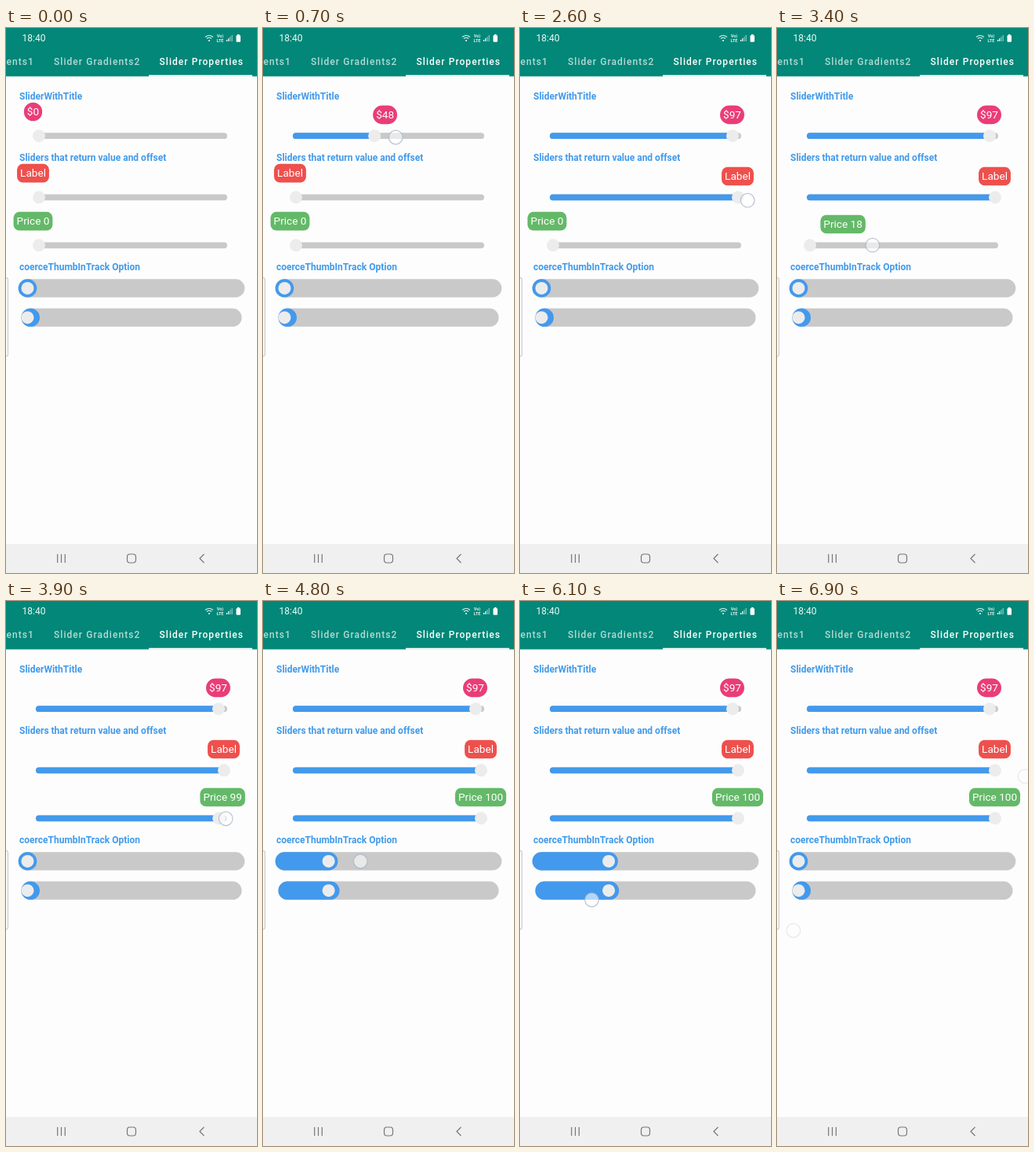
These frames come from a looping animation (320x693 px, 7000 ms). An HTML page with a canvas:

```html
<!DOCTYPE html>
<html lang="en">
<head>
<meta charset="utf-8">
<title>Slider Properties</title>
<style>
html, body { margin: 0; width: 100%; height: 100%; overflow: hidden; background: #fdfdfd; }
canvas { display: block; }
</style>
</head>
<body>
<canvas id="stage" width="320" height="693"></canvas>
<script>
const ctx = document.getElementById('stage').getContext('2d');
const LOOP = 7000, STEP = 100;
const BLUE = '#4399ec', TRACK = '#c9c9c9', THUMB = '#ececec', TEAL = '#028778';

// A finger swipe: x eases out with the given power, y moves evenly
const swipe = (start, end, x0, x1, y0, y1, power) => ({
  start, end,
  at(t) {
    const k = clamp((t - start) / (end - start), 0, 1);
    return { x: x1 + (x0 - x1) * (1 - k) ** power, y: y0 + (y1 - y0) * k };
  }
});
const swipes = {
  title: swipe(300, 1500, 42, 271, 138, 141, 2),
  label: swipe(1900, 2900, 42, 297, 215, 221, 3),
  price: swipe(3300, 4100, 42, 284, 276, 277, 3),
  right: swipe(4600, 5240, 43, 303, 331, 331, 1),
  left: swipe(5400, 6800, 303, 21, 341, 419, 2),
  edge: swipe(6600, 6800, 316, 316, 223, 223, 1)
};

const clamp = (v, lo, hi) => Math.min(hi, Math.max(lo, v));

// A thumb trails the finger and stays on its track
const trail = (path, t, lo, hi) => t < path.start ? lo : clamp(path.at(t).x, lo, hi);

function box(x, y, w, h, r, fill) {
  ctx.beginPath();
  ctx.roundRect(x, y, w, h, r);
  ctx.fillStyle = fill;
  ctx.fill();
}

function bar(x0, x1, y, h, fill) {
  box(x0, y - h / 2, x1 - x0, h, h / 2, fill);
}

function disc(x, y, r, fill) {
  ctx.beginPath();
  ctx.arc(x, y, r, 0, 7);
  ctx.fillStyle = fill;
  ctx.fill();
}

function line(d, color, width) {
  ctx.strokeStyle = color;
  ctx.lineWidth = width;
  ctx.stroke(new Path2D(d));
}

function text(str, x, y, font, color, align = 'left', spacing = 0) {
  ctx.font = font + ' Roboto, sans-serif';
  ctx.letterSpacing = spacing + 'px';
  ctx.textAlign = align;
  ctx.fillStyle = color;
  ctx.fillText(str, x, y);
}

function statusBar() {
  const pale = '#e4f3f0';
  text('18:40', 20.5, 17.2, '12px', '#eefaf7');
  line('M254 11.5Q259 7.5 264 11.5M256 13.5Q259 11 262 13.5', pale, 1.1);
  disc(259, 16, 1, '#fff');
  text('Vo)', 273, 12, 'bold 5.5px', pale, 'center');
  text('LTE', 273, 17.5, 'bold 5.5px', pale, 'center');
  for (let i = 0; i < 4; i++) box(281 + i * 2.2, 15 - i * 2, 1.2, 2 + i * 2, 0, i < 2 ? '#fff' : '#8ec8c0');
  box(293.5, 9.2, 5.5, 8.6, 1, '#fff');
  box(295, 8, 2.5, 2, 0, '#fff');
}

function header() {
  box(0, 0, 320, 61.6, 0, TEAL);
  statusBar();
  const tab = (str, x, color) => text(str, x, 47, '500 12px', color, 'left', 1.05);
  tab('ents1', 0.5, '#b5dad5');
  tab('Slider Gradients2', 61, '#b5dad5');
  tab('Slider Properties', 195.5, '#fff');
  box(182, 59.8, 132, 1.9, 0, '#fff');
}

function navigation() {
  box(0, 656, 320, 37, 0, '#f0f0f0');
  line('M65.7 669V680M70.5 669V680M75.3 669V680', '#777', 1.2);
  line('M252.5 669L247 674.5L252.5 680', '#777', 1.2);
  ctx.beginPath();
  ctx.roundRect(154.5, 669, 11, 11, 3.5);
  ctx.stroke();
}

function pillSlider(t, path, y, color, radius, caption) {
  const moved = t > path.start;
  const x = trail(path, t - STEP, 42, 278);
  bar(38, 282, y, 7.8, TRACK);
  if (moved) bar(38, x, y, 7.8, BLUE);
  disc(x, y, 8, THUMB);

  // The pill reacts sooner than the thumb and settles in place on first touch
  const lead = trail(path, t - STEP / 2, 42, 278);
  const label = caption(Math.round((lead - 42) / 2.36));
  const cx = moved ? lead - 0.5 : 34.5, cy = y - (moved ? 26.8 : 30.7);
  ctx.font = '13.6px Roboto, sans-serif';
  ctx.letterSpacing = '0px';
  const width = ctx.measureText(label).width + 8;
  box(cx - width / 2, cy - 11.8, width, 23.6, radius, color);
  text(label, cx, cy + 4.6, '13.6px', '#fff', 'center');
}

// Both wide sliders share one value
function wideSliders(t) {
  const late = t - STEP;
  const x = trail(late < swipes.left.start ? swipes.right : swipes.left, late, 27.5, 292.3);
  const inset = 15.5 - (x - 27.5) * 0.0283;
  const slider = (x0, x1, fillEnd, y) => {
    bar(x0, x1, y, 23.2, TRACK);
    bar(x0, fillEnd, y, 23.2, BLUE);
    disc(x, y, 8, THUMB);
  };
  slider(15.7, 304.3, x + 11.8, 330.9);
  slider(19.5, 300.5, x + inset, 368.2);
}

function finger(path, t) {
  if (t < path.start || t >= path.end + 2 * STEP) return;
  const { x, y } = path.at(t);
  ctx.globalAlpha = t > path.end ? 0.35 : 1;
  disc(x, y, 8.8, 'rgba(255,255,255,.6)');
  ctx.strokeStyle = 'rgba(165,178,198,.75)';
  ctx.lineWidth = 1.2;
  ctx.stroke();
  ctx.globalAlpha = 1;
}

function draw(t) {
  box(0, 0, 320, 693, 0, '#fdfdfd');
  header();
  const heading = (str, y) => text(str, 17, y, 'bold 12px', '#429aea');
  heading('SliderWithTitle', 90.5);
  heading('Sliders that return value and offset', 168.5);
  heading('coerceThumbInTrack Option', 307.5);
  pillSlider(t, swipes.title, 137.2, '#ea3d78', 11.8, v => '$' + v);
  pillSlider(t, swipes.label, 215.3, '#ee504d', 7.5, () => 'Label');
  pillSlider(t, swipes.price, 276.3, '#64b968', 7.5, v => 'Price ' + v);
  wideSliders(t);
  box(-6, 317, 9, 101, 3, '#c8c8c8');
  box(-6, 318, 8, 99, 2, '#fafafa');
  navigation();
  for (const path of Object.values(swipes)) finger(path, t);
}

function tick() {
  draw(Math.floor(performance.now() % LOOP / STEP) * STEP);
  requestAnimationFrame(tick);
}
tick();
</script>
</body>
</html>
```
